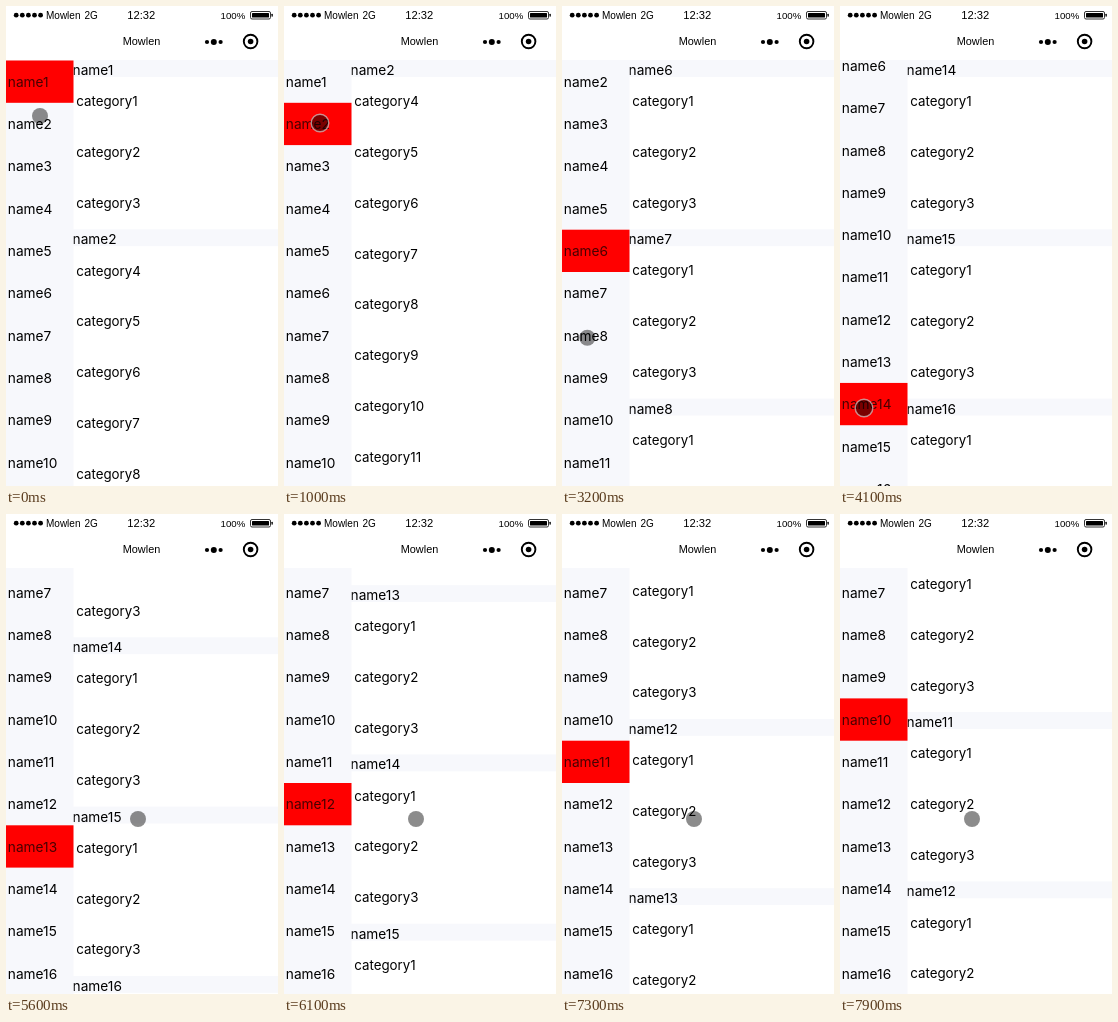
An HTML page that plays this animation: 272 px wide and 480 px high, repeating every 8000 ms.

```html
<!DOCTYPE html>
<html lang="en">
<head>
<meta charset="utf-8">
<title>Linked category lists</title>
<style>
  html, body { margin: 0; width: 100%; height: 100%; overflow: hidden; background: #fff; }
  svg { display: block; }
  .bar { font: 10px "Liberation Sans", Arial, sans-serif; }
  .list { font: 13.3px Inter, sans-serif; }
  .name { font-size: 13.7px; }
  .on rect { fill: #f00; }
  .on text { fill: #480000; }
</style>
</head>
<body>
<svg id="stage" width="272" height="480">
  <g class="bar">
    <g id="signal"></g>
    <text x="40" y="12.5">Mowlen</text>
    <text x="78.5" y="12.5">2G</text>
    <text x="135.3" y="12.5" font-size="11.2" text-anchor="middle">12:32</text>
    <text x="214.5" y="12.5" font-size="9.7">100%</text>
    <rect x="244.5" y="5.5" width="20" height="7.5" rx="1.5" fill="none" stroke="#000" stroke-width=".8"/>
    <rect x="246" y="7" width="17" height="4.5" rx=".5"/>
    <rect x="265.5" y="7.7" width="1.3" height="3" rx=".6"/>
    <text x="135.5" y="39" font-size="10.9" text-anchor="middle">Mowlen</text>
    <circle cx="201" cy="36" r="2.1"/>
    <circle cx="207.8" cy="36" r="3"/>
    <circle cx="214.6" cy="36" r="2.1"/>
    <circle cx="244.6" cy="35.5" r="6.8" fill="none" stroke="#000" stroke-width="1.9"/>
    <circle cx="244.6" cy="35.5" r="2.8"/>
  </g>
  <svg class="list" y="54" width="272" height="426">
    <g id="right"></g>
    <rect width="67.5" height="426" fill="#f7f8fc"/>
    <g id="side"></g>
  </svg>
  <circle id="cursor"/>
</svg>
<script>
const LOOP = 8000, STEP = 100;
const ROW = 42.3, HEAD = 16.9, ITEM = 50.8, COUNT = 16;
const $ = id => document.getElementById(id);

function add(parent, tag, attrs, text = '') {
  const el = document.createElementNS('http://www.w3.org/2000/svg', tag);
  for (const k in attrs) el.setAttribute(k, attrs[k]);
  el.textContent = text;
  return parent.appendChild(el);
}

for (let i = 0; i < 5; i++)
  add($('signal'), 'circle', { cx: 10.2 + i * 6.1, cy: 9.2, r: 2.4 });

// Section 2 is long; all others hold three categories.
const tops = [0], rows = [];
let y = 0;
for (let n = 1; n <= COUNT; n++) {
  const row = add($('side'), 'g', { transform: `translate(0 ${(n - 1) * ROW + .5})` });
  add(row, 'rect', { width: 67.5, height: ROW, fill: 'none' });
  add(row, 'text', { class: 'name', x: 1.8, y: 26.4 }, 'name' + n);
  rows[n] = row;

  tops[n] = y;
  add($('right'), 'rect', { x: 67, y, width: 205, height: HEAD, fill: '#f7f8fc' });
  add($('right'), 'text', { class: 'name', x: 66.6, y: y + 15 }, 'name' + n);
  y += HEAD;
  const first = n === 2 ? 4 : 1, last = n === 2 ? 15 : 3;
  for (let c = first; c <= last; c++, y += ITEM)
    add($('right'), 'text', { x: 70.3, y: y + 29.3 }, 'category' + c);
}

const inOut = p => p < .5 ? 4 * p ** 3 : 1 - 4 * (1 - p) ** 3;
const linear = p => p;

// keys: [time, value, ...]
function track(keys, t, ease) {
  for (let i = 2; i < keys.length; i += 2)
    if (t < keys[i]) {
      const [t0, a, t1, b] = keys.slice(i - 2, i + 2);
      return a + (b - a) * ease((t - t0) / (t1 - t0));
    }
  return keys[keys.length - 1];
}

const end = COUNT * ROW - 426;
const sideKeys = [0, 0, 1500, 0, 1800, ROW, 3660, ROW, 3860, 5 * ROW, 3960, 5 * ROW, 4260, end];
const jumpKeys = [0, 0, 600, 0, 900, tops[2], 2100, tops[2], 2534, tops[6],
  3660, tops[6], 3860, tops[10], 4080, tops[14]];
const wheelKeys = [0, 0, 5400, 0, 5600, 69.3, 6700, 327, 7900, 652];
const xKeys = [0, 34, 500, 36, 1100, 36, 1400, 27, 2700, 27, 3600, 24, 4400, 24, 5300, 132];
const yKeys = [0, 110, 500, 117, 1100, 117, 1400, 287, 1500, 287, 1800, 244,
  2700, 244, 3600, 402, 4400, 402, 5300, 305];
const presses = [[600, 1100], [1500, 1800], [2100, 2500], [3660, 4250]];

function selected(t, scroll) {
  if (t < 600) return 1;
  if (t < 2100) return 2;
  if (t < 3660) return 6;
  if (t < 3860) return 10;
  if (t < 5500) return 14;
  return tops.findLastIndex(top => top <= scroll);
}

function draw(t) {
  const scroll = track(jumpKeys, t, inOut) - track(wheelKeys, t, linear);
  $('right').setAttribute('transform', `translate(0 ${-scroll})`);
  $('side').setAttribute('transform', `translate(0 ${-track(sideKeys, t, inOut)})`);
  const sel = selected(t, scroll);
  rows.forEach((row, n) => row.setAttribute('class', n === sel ? 'on' : ''));

  const down = presses.some(([a, b]) => t >= a && t < b);
  const look = {
    cx: track(xKeys, t, linear), cy: track(yKeys, t, linear),
    r: down ? 8.8 : 8,
    fill: down ? 'rgba(0,0,0,.52)' : 'rgba(0,0,0,.45)',
    stroke: down ? 'rgba(205,190,190,.75)' : 'none',
    'stroke-width': 1.4
  };
  for (const k in look) $('cursor').setAttribute(k, look[k]);
}

const start = performance.now();
function tick() {
  const t = (performance.now() - start) % LOOP;
  draw(Math.floor(t / STEP) * STEP);
  requestAnimationFrame(tick);
}
tick();
</script>
</body>
</html>
```
